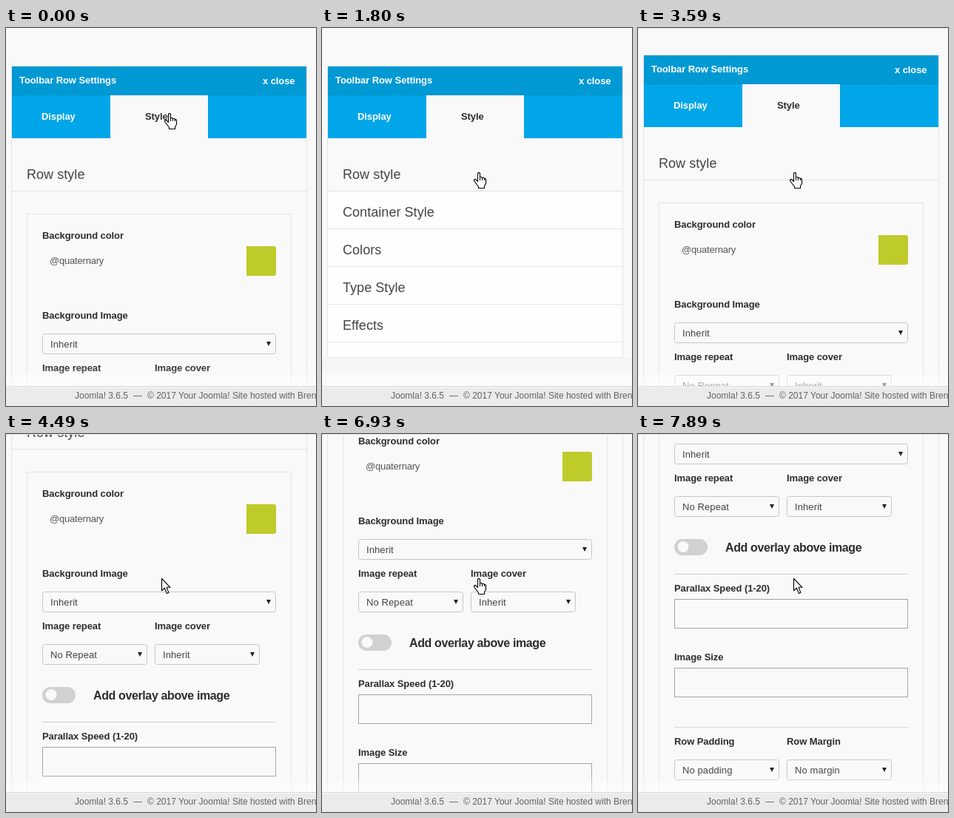
An HTML page for the animation above (8 s loop, 419 by 511 pixels).

```html
<!DOCTYPE html>
<html lang="en">
<head>
<meta charset="utf-8">
<title>Toolbar row settings</title>
<style>
html, body { margin: 0; width: 100%; height: 100%; overflow: hidden; background: #f9f9f9; }
body { position: relative; }
svg { position: absolute; left: 0; top: 0; }
text { font: 13px "Liberation Sans", Arial, sans-serif; fill: #444; white-space: pre; }
.label { font-weight: bold; fill: #2c2c2c; letter-spacing: -.08px; }
.light { fill: #fff; }
.head { font-size: 18px; fill: #444; letter-spacing: .05px; }
.big { font-size: 16px; letter-spacing: -.38px; }
.value { letter-spacing: .1px; }
.color { fill: #555; letter-spacing: -.2px; }
#status {
  position: absolute; left: 0; top: 484px; width: 419px; height: 27px;
  box-sizing: border-box; border-top: 1px solid #d4d4d4; background: #ebebeb;
  box-shadow: 0 1px 0 rgba(255,255,255,.8) inset, 0 -15px 15px rgba(255,255,255,.6);
  font: 12px/25px "Liberation Sans", Arial, sans-serif; color: #626262;
  padding-left: 93px; white-space: pre; overflow: hidden;
}
#status span { position: absolute; }
</style>
</head>
<body>
<svg id="page" width="419" height="511"></svg>
<div id="status"><span>Joomla! 3.6.5</span><span style="left:172px">—</span><span style="left:191px">© 2017 Your Joomla! Site hosted with Brenhost</span></div>
<svg id="pointer" width="419" height="511"></svg>
<script>
const $ = id => document.getElementById(id);
const EDGE = '#e4e4e4', BG = '#f9f9f9', TOP = 221, FULL = 2000;

const rect = (x, y, w, h, fill, extra = '') =>
  `<rect x="${x}" y="${y}" width="${w}" height="${h}" fill="${fill}" ${extra}/>`;
const text = (x, y, s, cls = 'label') => `<text x="${x}" y="${y}" class="${cls}">${s}</text>`;
const frame = (x, y, w, h, stroke, r = 0) =>
  rect(x + .5, y + .5, w - 1, h - 1, BG, `stroke="${stroke}" rx="${r}"`);
const select = (x, y, w, s) => frame(x, y, w, 28, '#c6c6c6', 3) +
  text(x + 11, y + 19, s, 'value') +
  `<path d="M${x + w - 13} ${y + 11}h6l-3 6z" fill="#222"/>`;

const header = rect(7, 51, 400, 1, EDGE) +
  rect(8, 52, 398, 39, '#0099d4') + rect(8, 90, 398, 1, '#0092cb') +
  rect(8, 91, 398, 58, '#00a6e8') + rect(141, 91, 132, 58, BG) +
  text(18, 75, 'Toolbar Row Settings', 'label light') + text(347, 76, 'x close', 'label light') +
  text(48, 124, 'Display', 'label light') + text(188, 124, 'Style') +
  text(28, 204, 'Row style', 'head') + rect(8, 220, 398, 1, EDGE);

const form = frame(28, 251, 358, 1400, EDGE) +
  text(49, 285, 'Background color') + text(59, 319, '@quaternary', 'color') +
  '<path d="M325 295h37q3 0 3 3v34q0 3-3 3h-37z" fill="#bfcb2b"/>' +
  text(49, 393, 'Background Image') + select(49, 413, 316, 'Inherit') +
  text(49, 464, 'Image repeat') + select(49, 484, 142, 'No Repeat') +
  text(201, 464, 'Image cover') + select(201, 484, 142, 'Inherit') +
  rect(49, 542, 45, 22, '#d1d1d1', 'rx="11"') + `<circle cx="61" cy="552.5" r="7.5" fill="${BG}"/>` +
  text(118, 559, 'Add overlay above image', 'label big') + rect(49, 589, 316, 1, '#cfcfcf') +
  text(49, 613, 'Parallax Speed (1-20)') + frame(49, 623, 316, 40, '#a5a5a5') +
  text(49, 706, 'Image Size') + frame(49, 716, 316, 40, '#a5a5a5') +
  rect(49, 796, 316, 1, '#d6d6d6') +
  text(49, 820, 'Row Padding') + select(49, 840, 142, 'No padding') +
  text(201, 820, 'Row Margin') + select(201, 840, 142, 'No margin');

const rows = rect(0, 446, 419, 21, '#f5f5f5') + rect(8, TOP + 2, 398, 222, '#fefefe') +
  ['Container Style', 'Colors', 'Type Style', 'Effects'].map((s, i) =>
    text(28, 255 + 51 * i, s, 'head') + rect(8, 271 + 51 * i, 398, 1, EDGE)).join('') +
  rect(7, 445, 400, 1, EDGE);

$('page').innerHTML = `<clipPath id="fold"><rect id="window" x="0" y="${TOP}" width="419"/></clipPath>
  <g id="panel">${header}<g clip-path="url(#fold)">${form}</g><g id="rows">${rows}</g>
  <g id="sides">${rect(7, 52, 1, 1, EDGE) + rect(406, 52, 1, 1, EDGE)}</g></g>` +
  rect(0, 0, 419, 1, '#e2e2e2', 'id="rule"');

$('pointer').innerHTML = `<g fill="#fff" stroke="#000" stroke-width="1.1" stroke-linejoin="round">
  <path id="arrow" d="M.5.5V16.8L4.3 13.2L7.4 20.5L9.9 19.4L7 12.3H12Z"/>
  <path id="hand" d="M5.5 13V1.5L6.5.5H7.5L8.5 1.5V6.5H10.5L11.5 7.5H13.5L14.5 8.5H15.5L16.5 9.5V15.5L14.5 18.5V21.5H6.5V19.5L.5 11.5V10.5L1.5 9.5H2.5L5.5 12.5M8.5 6.5V11M11.5 7.5V11M14.5 8.5V11"/></g>`;

// Stepped tracks: [start time, value...]
const scrolls = [[0, 0], [3590, 15], [3720, 92], [3870, 100], [4330, 170], [4490, 200],
  [6410, 205], [6530, 275], [6660, 300], [6930, 271], [7080, 200],
  [7500, 215], [7620, 310], [7740, 395], [7890, 400]];
const folds = [[0, FULL], [1530, 150], [1650, 30], [1800, 0],
  [2640, 24], [2790, 130], [2910, 230], [3030, FULL]];
const cursors = [[0, 'hand', 214, 115], [440, 'arrow', 213, 156], [580, 'hand', 207, 170],
  [700, 'hand', 205, 185], [820, 'hand', 205, 195], [3870, 'arrow', 210, 195],
  [6930, 'hand', 205, 195], [7230, 'arrow', 210, 195]];
const at = (track, t) => track.findLast(k => k[0] <= t).slice(1);
const move = (id, x, y) => $(id).setAttribute('transform', `translate(${x} ${y})`);

function draw(now) {
  const t = now % 8000;
  const [scroll] = at(scrolls, t), [open] = at(folds, t), [kind, x, y] = at(cursors, t);
  move('panel', 0, -scroll);
  move('rows', 0, open);
  $('window').setAttribute('height', open);
  for (const side of $('sides').children) side.setAttribute('height', 394 + open);
  $('rule').style.display = scroll ? '' : 'none';
  for (const id of ['hand', 'arrow']) $(id).style.display = id === kind ? '' : 'none';
  move(kind, x, y);
  requestAnimationFrame(draw);
}
draw(0);
</script>
</body>
</html>
```
